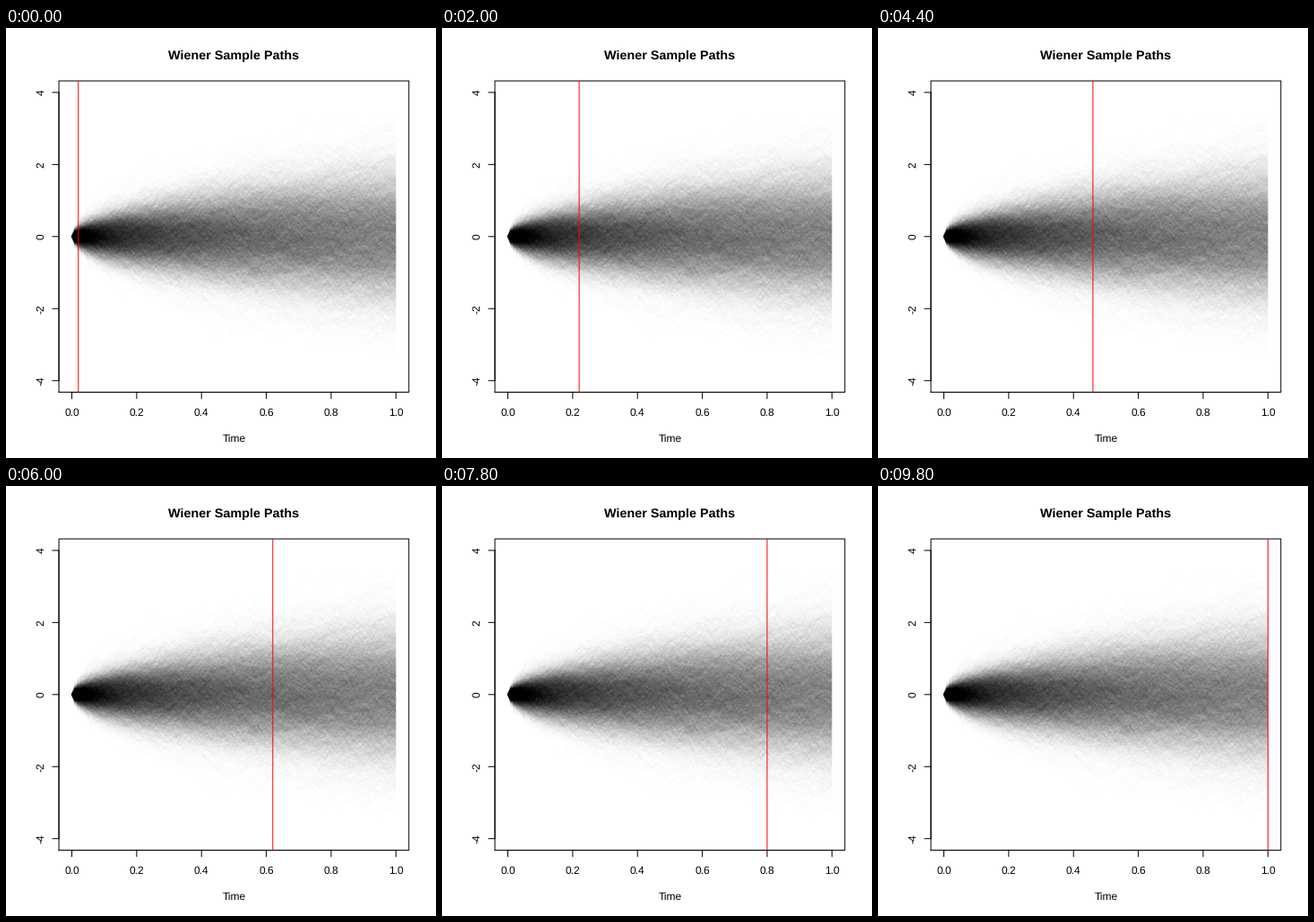
Animation, 480 px wide and 480 px high, one loop 9.9 s. Source, as a matplotlib script:

```python
import matplotlib.pyplot as plt
import numpy as np
from matplotlib.animation import FuncAnimation
from matplotlib.collections import LineCollection

SIZE, DPI = 480, 100
PX = 72 / DPI                      # one pixel in points
LEFT, RIGHT, TOP, BOTTOM = 59.04, 449.76, 59.04, 406.56
TICK = 7.2
FRAMES, INTERVAL = 99, 100
LAYERS, PATHS, STEPS, ALPHA = 5, 1000, 100, 0.045

plt.rcParams["font.family"] = "Liberation Sans"
plt.rcParams["text.hinting"] = "none"


def px_x(t):
    return 73.51 + 361.78 * t


def px_y(w):
    return 232.8 - 40.22 * w


def stroke(ax, xs, ys, color="black", cap="butt", z=3):
    line, = ax.plot(xs, ys, color=color, lw=PX, solid_capstyle=cap,
                    snap=False, zorder=z)
    return line


def label(ax, x, y, text, size=12, **kw):
    ax.text(x, y, text, fontsize=size * PX, ha="center", va="baseline",
            rotation_mode="anchor", **kw)


def wiener_paths(rng):
    t = np.linspace(0, 1, STEPS + 1)
    steps = rng.normal(0, STEPS ** -0.5, (PATHS, STEPS))
    w = np.hstack([np.zeros((PATHS, 1)), steps.cumsum(axis=1)])
    return np.stack([np.broadcast_to(px_x(t), w.shape), px_y(w)], axis=-1)


def render_cloud(fig, ax):
    """Geometric mean of several layers: many very faint paths, no rounding."""
    rng = np.random.default_rng(11)
    clip = plt.Rectangle((LEFT, TOP), RIGHT - LEFT, BOTTOM - TOP,
                         transform=ax.transData)
    depth = 0
    for _ in range(LAYERS):
        paths = LineCollection(wiener_paths(rng), colors=[(0, 0, 0, ALPHA)],
                               linewidths=PX)
        ax.add_collection(paths, autolim=False)
        paths.set_clip_path(clip)
        fig.canvas.draw()
        gray = np.asarray(fig.canvas.buffer_rgba())[..., 0] / 255
        depth = depth + np.log(np.maximum(gray, 0.002))
        paths.remove()
    tone = np.exp(depth / LAYERS)
    return np.repeat(tone[..., None], 3, axis=2)


def draw_chart(ax):
    stroke(ax, [LEFT, RIGHT, RIGHT, LEFT, LEFT],
           [BOTTOM, BOTTOM, TOP, TOP, BOTTOM], cap="round")

    stroke(ax, [px_x(0), px_x(1)], [BOTTOM, BOTTOM], cap="round")
    for v in np.arange(6) / 5:
        x = px_x(v)
        stroke(ax, [x, x], [BOTTOM, BOTTOM + TICK], cap="round")
        label(ax, x, 433, f"{v:.1f}")

    stroke(ax, [LEFT, LEFT], [px_y(-4), px_y(4)], cap="round")
    for v in range(-4, 5, 2):
        y = px_y(v)
        stroke(ax, [LEFT - TICK, LEFT], [y, y], cap="round")
        label(ax, 42.6, y, str(v), rotation=90)

    label(ax, 254.4, 35, "Wiener Sample Paths", 14.4, weight="bold")
    label(ax, 254.4, 462, "Time")


fig = plt.figure(figsize=(SIZE / DPI, SIZE / DPI), dpi=DPI, facecolor="white")
ax = fig.add_axes([0, 0, 1, 1])
ax.set_xlim(0, SIZE)
ax.set_ylim(SIZE, 0)
ax.axis("off")

# the heavy cloud is rendered once and kept as a still backdrop
fig.figimage(render_cloud(fig, ax), origin="upper", zorder=-1)
draw_chart(ax)
cursor = stroke(ax, [], [], color="red", z=4)


def update(i):
    x = px_x(0.02 + 0.01 * i)
    cursor.set_data([x, x], [TOP, BOTTOM])
    return cursor,


anim = FuncAnimation(fig, update, frames=FRAMES, interval=INTERVAL,
                     repeat=True, repeat_delay=0)
plt.show()
```
